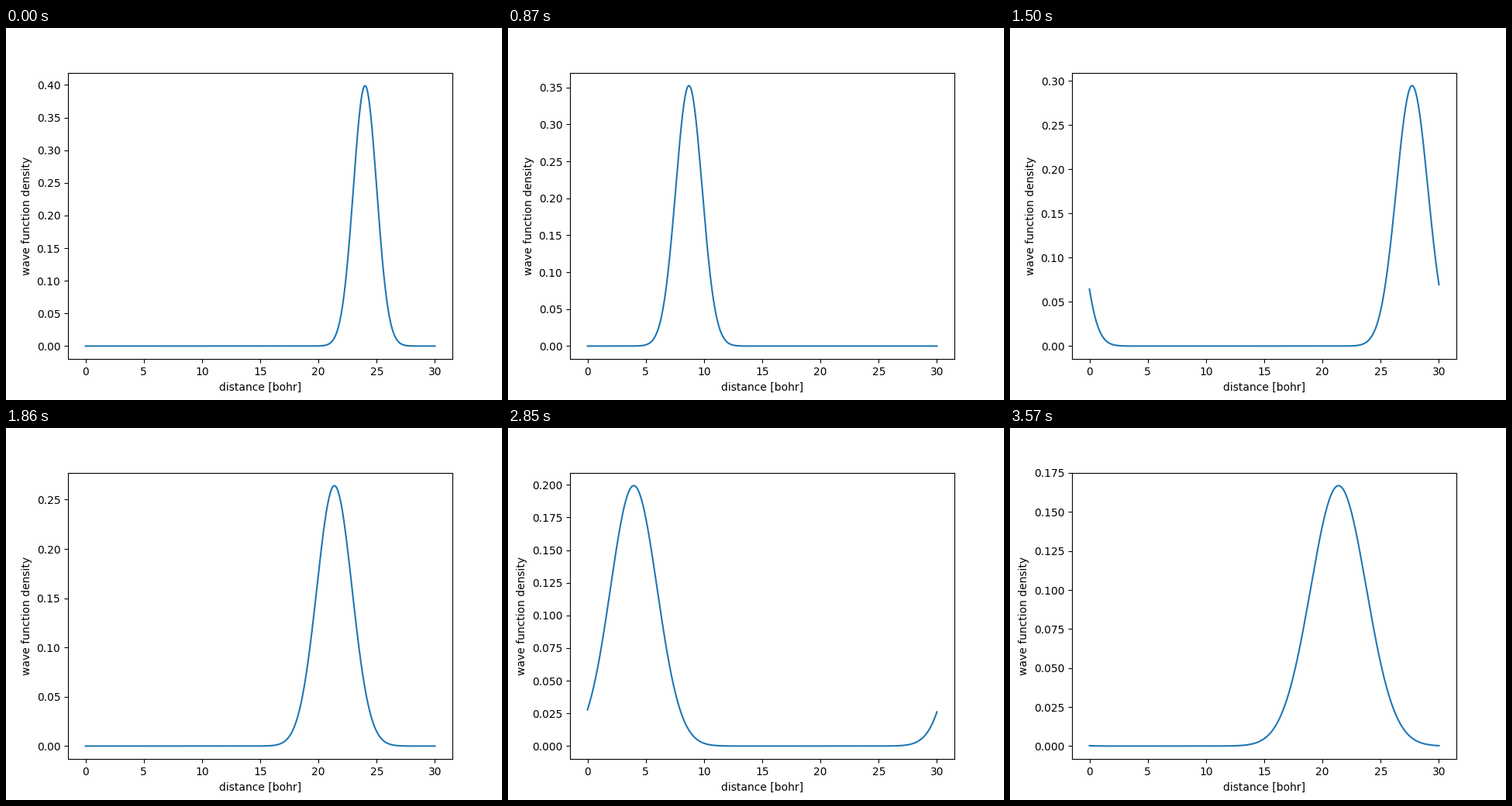
A matplotlib script for the animation above (3600 ms loop, 640 by 480 pixels).

```python
import numpy as np
import matplotlib.pyplot as plt
from matplotlib.animation import FuncAnimation

FRAMES = 120
INTERVAL = 30        # ms
LENGTH = 30.0        # bohr
POINTS = 512
START = 24.0
STEP = 0.5272        # drift to the left per frame
SPREAD = 0.01825     # dispersion per frame

x = np.linspace(0, LENGTH, POINTS)
period = LENGTH + x[1]   # both end points belong to the periodic grid


def density(frame):
    """Free Gaussian wave packet on a ring, drifting and spreading."""
    center = START - STEP * frame
    sigma = np.sqrt(1 + (SPREAD * frame) ** 2)
    offset = (x - center + period / 2) % period - period / 2
    return np.exp(-0.5 * (offset / sigma) ** 2) / (sigma * np.sqrt(2 * np.pi))


fig, ax = plt.subplots(figsize=(6.4, 4.8), dpi=100)
line, = ax.plot(x, density(0))
ax.set_xlabel("distance [bohr]")
ax.set_ylabel("wave function density")


def update(frame):
    line.set_ydata(density(frame))
    ax.relim()
    ax.autoscale_view()
    return line,


anim = FuncAnimation(fig, update, frames=FRAMES, interval=INTERVAL,
                     repeat=True, repeat_delay=0, blit=False)
plt.show()
```
